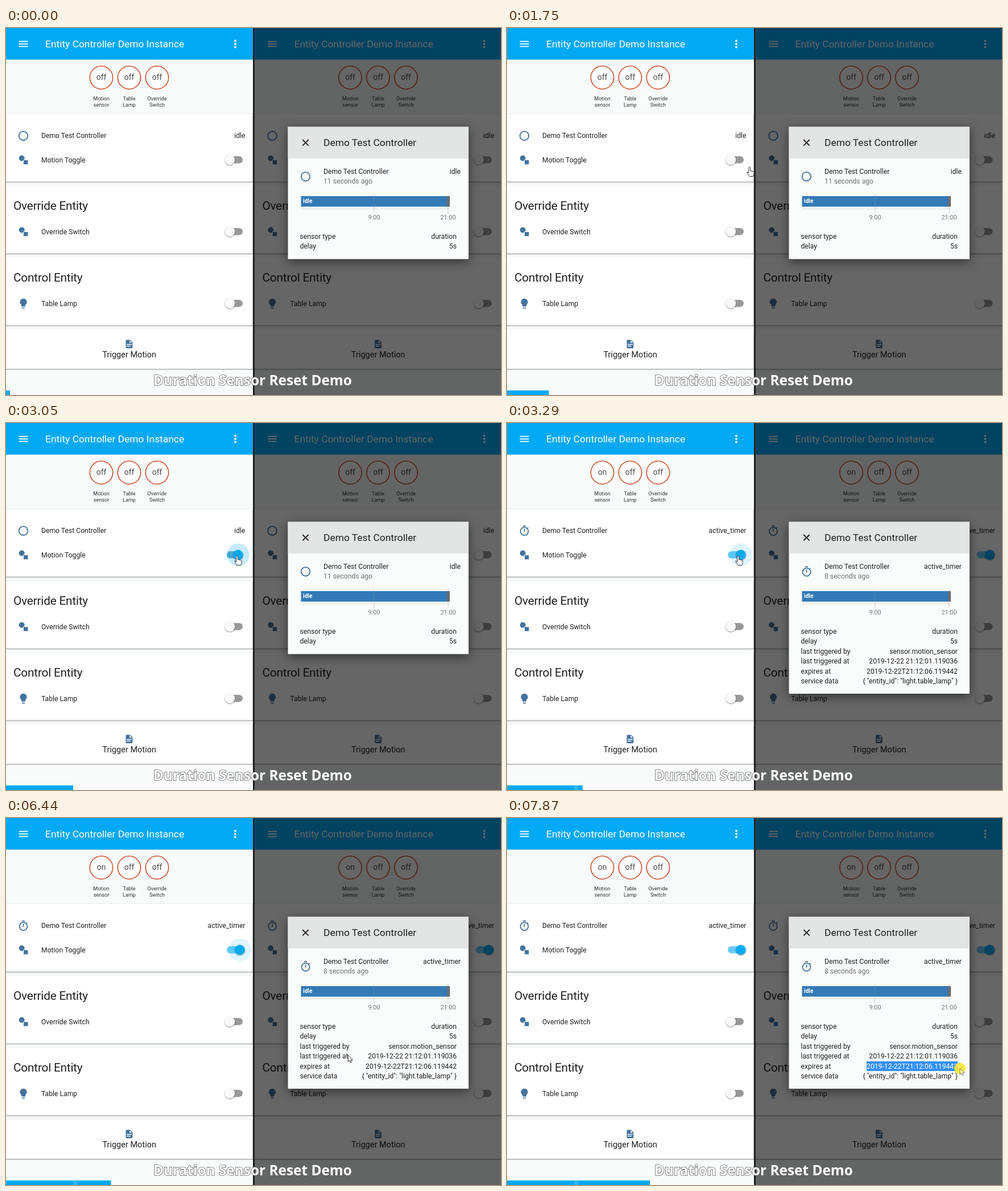
These frames come from a looping animation (870 by 644 pixels, 7.99 s). An HTML page:

```html
<!DOCTYPE html>
<html lang="en">
<head>
<meta charset="utf-8">
<title>Duration Sensor Reset Demo</title>
<style>
  html, body { margin: 0; width: 100%; height: 100%; overflow: hidden; background: #222; }
  svg { display: block; width: 870px; height: 644px; font-family: Roboto, sans-serif; }
  text { white-space: pre; }
  .card { fill: #fff; filter: drop-shadow(0 1.5px 1px rgba(0,0,0,.45)); }
  .knob { filter: drop-shadow(0 1px 1.2px rgba(0,0,0,.45)); }
  .dialog { fill: #fafbfb; filter: drop-shadow(0 5px 9px rgba(0,0,0,.5)); }
  .caption { font: 700 24.4px "Open Sans", sans-serif; fill: #fff; stroke: #666; stroke-width: 1.6px; paint-order: stroke; }
</style>
</head>
<body>
<svg id="stage" viewBox="0 0 870 644"></svg>
<script>
const LOOP = 7990, BODY = 12.18, BLUE = '#03a9f4', ICON = '#44739e', INK = '#212121';

const ticks = [0, 860, 970, 1080, 1190, 1300, 1410, 1520, 1630, 1750, 1850, 1970, 2080, 2830,
  2970, 3050, 3170, 3290, 5790, 5890, 6000, 6110, 6220, 6330, 6440, 6540, 6660, 6780,
  7220, 7340, 7550, 7660, 7770, 7870];

// Pointer path: time, x, y
const path = [[860, 776, 632], [1300, 550, 370], [1630, 434, 252], [1750, 426, 244], [1970, 406, 233],
  [5789, 406, 233], [5790, 472, 273], [6540, 621, 438], [6780, 630, 438], [7340, 630, 438],
  [7550, 648, 438], [7870, 796, 439]];

function pointerAt(t) {
  const i = path.findIndex(k => k[0] >= t);
  if (i <= 0) return path[0].slice(1);
  const [a, b] = [path[i - 1], path[i]], p = (t - a[0]) / (b[0] - a[0]);
  return [a[1] + (b[1] - a[1]) * p, a[2] + (b[2] - a[2]) * p];
}

const rect = (x, y, w, h, fill, extra = '') =>
  `<rect x="${x}" y="${y}" width="${w}" height="${h}" fill="${fill}" ${extra}/>`;
const circle = (x, y, r, fill, extra = '') =>
  `<circle cx="${x}" cy="${y}" r="${r}" fill="${fill}" ${extra}/>`;
const text = (x, y, str, size = BODY, fill = INK, extra = '') =>
  `<text x="${x}" y="${y}" font-size="${size}" fill="${fill}" ${extra}>${str}</text>`;
const END = 'text-anchor="end"', MIDDLE = 'text-anchor="middle"';
const shape = (x, y, scale, d) =>
  `<path transform="translate(${x} ${y}) scale(${scale})" d="${d}" fill="${ICON}" fill-rule="evenodd"/>`;

function stateIcon(x, y, active) {
  if (!active) return circle(x, y, 7.8, 'none', `stroke="${ICON}" stroke-width="1.8"`);
  return `<g transform="translate(${x - 10.4} ${y - 10.4}) scale(.87)" fill="none" stroke="${ICON}" stroke-width="2">
    <circle cx="12" cy="13" r="8"/><path d="M9 2h6M12 8v6M18.2 6.8l1.6-1.6"/></g>`;
}

const linkIcon = y => circle(27.7, y - 3, 5, ICON) +
  rect(30.7, y, 8.2, 8.2, ICON, 'stroke="#fff" stroke-width=".8"');

// Knob travels from 0 (off) to 1 (on)
function toggle(y, pos = 0, ripple = 0, settled = true) {
  const x = 393.5 + 17.5 * pos, on = pos > 0;
  return rect(388, y - 6.2, 28, 12.4, !on ? '#999' : settled ? '#68cbf8' : '#5ba6c6', 'rx="6.2"') +
    (ripple ? circle(x, y, 20, BLUE, `opacity="${ripple}"`) : '') +
    circle(x, y, 8.7, on ? BLUE : '#fafafa', 'class="knob"');
}

function badge(x, value, line1, line2) {
  return circle(x, 87, 20.2, '#fff', 'stroke="#cb4f2c" stroke-width="1.6"') +
    text(x, 91, value, 14, '#4c4c4c', MIDDLE) +
    text(x, 127, line1, 9.1, '#333', MIDDLE) + text(x, 138, line2, 9.1, '#333', MIDDLE);
}

function panel(active, knob, ripple, settled) {
  const card = (y, h) => rect(-4, y, 442, h, '#fff', 'class="card"');
  const heading = (y, str) => text(13, y, str, 20.9, INK, 'letter-spacing="-.25"');
  return rect(0, 0, 438, 644, '#f9fafa') + rect(0, 0, 438, 55.5, BLUE) +
    [22.7, 27.1, 31.5].map(y => rect(22.7, y, 15.8, 1.8, '#fff')).join('') +
    [22.5, 28, 33.5].map(y => circle(403, y, 1.9, '#fff')).join('') +
    text(69, 34, 'Entity Controller Demo Instance', 17.4, '#fff') +
    badge(167.5, active ? 'on' : 'off', 'Motion', 'sensor') +
    badge(216.5, 'off', 'Table', 'Lamp') +
    badge(265.5, 'off', 'Override', 'Switch') +
    card(150.5, 119) + card(277, 118.5) + card(403, 118.5) + card(529, 69) +
    stateIcon(30.5, 189.2, active) + text(62, 193, 'Demo Test Controller') +
    text(420.5, 193, active ? 'active_timer' : 'idle', BODY, INK, END) +
    linkIcon(231.5) + text(62, 235.5, 'Motion Toggle') + toggle(231.3, knob, ripple, settled) +
    heading(318.5, 'Override Entity') +
    linkIcon(357.5) + text(62, 361.5, 'Override Switch') + toggle(357.2) +
    heading(444.5, 'Control Entity') +
    shape(20.1, 473, .87, 'M12 2A7 7 0 0 0 5 9C5 11.4 6.2 13.5 8 14.7V17A1 1 0 0 0 9 18H15A1 1 0 0 0 16 17V14.7C17.8 13.5 19 11.4 19 9A7 7 0 0 0 12 2M9 21A1 1 0 0 0 10 22H14A1 1 0 0 0 15 21V20H9Z') +
    text(62, 487.5, 'Table Lamp') + toggle(483.2) +
    shape(207.6, 545.7, .74, 'M13 9H18.5L13 3.5ZM6 2H14L20 8V20A2 2 0 0 1 18 22H6A2 2 0 0 1 4 20V4A2 2 0 0 1 6 2M15 18V16H6V18ZM18 14V12H6V14Z') +
    text(216.7, 577.5, 'Trigger Motion', 14.5, INK, MIDDLE);
}

function dialog(active, selectedTo) {
  const expires = '2019-12-22T21:12:06.119442';
  const rows = [['sensor type', 'duration'], ['delay', '5s']];
  if (active) rows.push(['last triggered by', 'sensor.motion_sensor'],
    ['last triggered at', '2019-12-22 21:12:01.119036'], ['expires at', expires],
    ['service data', '{ "entity_id": "light.table_lamp" }']);
  const selection = selectedTo > 632 ?
    `<clipPath id="selected">${rect(632, 427, selectedTo - 632, 17, '#000')}</clipPath><g clip-path="url(#selected)">` +
    rect(632, 427, 160.5, 17, '#3390ff') + text(792, 439.7, expires, BODY, '#fff', END) + '</g>' : '';
  return rect(495.5, 173.5, 317.5, active ? 301.5 : 232, '', 'class="dialog"') +
    rect(495.5, 173.5, 317.5, 55.5, '#e3e4e4') +
    `<path d="M521.3 196l10.4 10.4m0-10.4l-10.4 10.4" stroke="${INK}" stroke-width="1.8"/>` +
    text(558, 207, 'Demo Test Controller', 17.4) +
    stateIcon(526.5, 260.7, active) + text(558, 256, 'Demo Test Controller') +
    text(799, 256, active ? 'active_timer' : 'idle', BODY, INK, END) +
    text(558, 273.3, active ? '8 seconds ago' : '11 seconds ago', BODY, '#727272') +
    rect(518.5, 317, 261.5, 1, '#dcdcdc') +
    rect(518.5, 295, 257, 18.5, '#337ab7') + rect(775, 295, 5, 18.5, '#666') +
    [647, 777].map(x => rect(x - .5, 291, 1, 34, '#999', 'opacity=".4"')).join('') +
    text(522, 307, 'idle', 10, '#fff', 'font-weight="700"') +
    text(647, 335.7, '9:00', 10.9, '#757575', MIDDLE) + text(777, 335.7, '21:00', 10.9, '#757575', MIDDLE) +
    rows.map(([key, value], i) => {
      const y = 370 + 17.42 * i;
      return text(516.5, y, key) + text(792, y, value, BODY, INK, END);
    }).join('') + selection;
}

function pointer(t, x, y) {
  if (t < 860) return '';
  const pressed = t === 2830 || t >= 7220, hand = t >= 1750 && t < 5790;
  const glow = pressed ? circle(x, y + .5, 10, '#fde62f', 'opacity=".88"') : '';
  const outline = hand ?
    'M-1.3 1.5a1.4 1.4 0 0 1 2.8 0V6.5l5 1.2q2 .6 1.9 2.6l-.6 3.2-1.2 3H.2L-4 10.5q-.9-1.8.8-1.7l1.9 1.9z' :
    'M0 0V11.5l2.7-2.5 1.8 4.2 2-.9-1.8-4H8.4z';
  return glow + `<path transform="translate(${x} ${y})" d="${outline}" fill="#fff" stroke="#222"
    stroke-width=".9" stroke-linejoin="round" opacity="${t >= 7220 ? .6 : 1}"/>`;
}

function draw(step) {
  const t = ticks[step], [x, y] = pointerAt(t), active = t >= 3170;
  const knob = t < 2970 ? 0 : t < 3050 ? .3 : t < 3170 ? .83 : 1;
  const ripple = t < 2830 || t >= 7340 ? 0 : t < 3170 ? .22 : .13;
  const remoteKnob = t < 3170 ? 0 : t < 3290 ? .6 : 1;
  const selectedTo = t >= 7550 ? Math.min(792.5, x) : 0;
  document.getElementById('stage').innerHTML =
    panel(active, knob, ripple, active) +
    `<g transform="translate(437.5 0)">${panel(active, remoteKnob, 0, true)}</g>` +
    rect(437, 0, 433, 644, '#000', 'opacity=".6"') +
    rect(434, 0, 3, 644, '#202124') +
    dialog(active, selectedTo) +
    rect(0, 636, 7 + 7.4 * step, 8, BLUE) +
    (active ? rect(118, 636, 7.5, 8, '#2fb6f3') : '') +
    text(259, 626.5, 'Duration Sensor Reset Demo', 24.4, '#fff', 'class="caption"') +
    pointer(t, x, y);
}

let shown = -1;
function tick(now) {
  const t = now % LOOP, next = ticks.findIndex(k => k > t);
  const step = (next < 0 ? ticks.length : next) - 1;
  if (step !== shown) draw(shown = step);
  requestAnimationFrame(tick);
}
tick(0);
</script>
</body>
</html>
```
